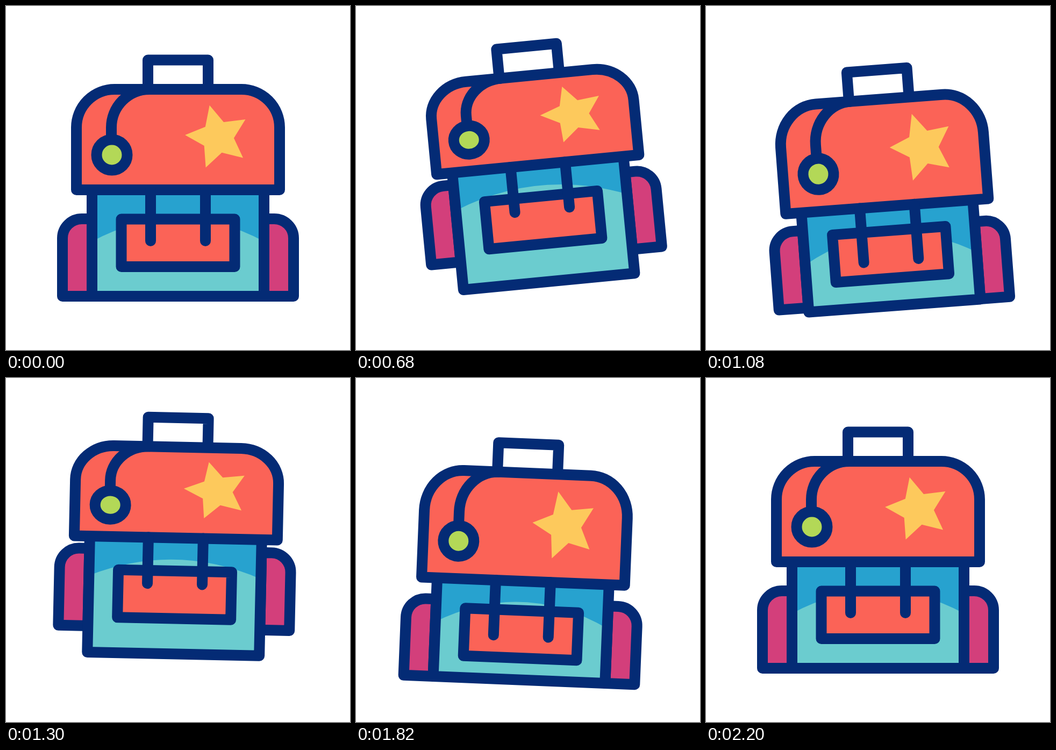
An HTML page with a canvas for the animation above (2400 ms loop, 640 px wide and 640 px high).

```html
<!DOCTYPE html>
<html lang="en">
<head>
<meta charset="utf-8">
<title>Jumping backpack</title>
<style>
  html, body { margin: 0; width: 100%; height: 100%; overflow: hidden; background: #fff; }
  canvas { display: block; width: 640px; height: 640px; }
</style>
</head>
<body>
<canvas id="stage" width="640" height="640"></canvas>
<script>
const ctx = document.getElementById('stage').getContext('2d');
const LOOP = 2400, STEP = 20, REST = 200, MOVE = 2000;
const BEATS = [490, 790, 1130, 1540]; // up, down, up, down
const PIVOT = 131, LID_TOP = 155;
const NAVY = '#042b75', CORAL = '#fb6357', YELLOW = '#fdc95c', LIME = '#b3d857',
      BLUE = '#27a2cf', TEAL = '#6bcccf', PINK = '#d33f7b';

// Starts and ends at 0, easing in and out of each peak
function swing(t, peaks, lag = 0, beats = BEATS) {
  let from = 0, start = 0;
  for (let i = 0; i <= peaks.length; i++) {
    const to = i < peaks.length ? peaks[i] : 0;
    const end = i < peaks.length ? beats[i] + lag : MOVE;
    if (t <= end) return from + (to - from) * (1 - Math.cos(Math.PI * (t - start) / (end - start))) / 2;
    from = to;
    start = end;
  }
  return 0;
}

// Stretches the outline from the lid's top edge, not the line weight
function shape(build, fill, outlined = true, stretch = 1) {
  ctx.save();
  ctx.translate(0, LID_TOP);
  ctx.scale(1, stretch);
  ctx.translate(0, -LID_TOP);
  ctx.beginPath();
  build();
  ctx.restore();
  if (fill) {
    ctx.fillStyle = fill;
    ctx.fill();
  }
  if (outlined) ctx.stroke();
}

function line(...points) {
  points.forEach(([x, y]) => ctx.lineTo(x, y));
}

function handle() {
  shape(() => line([264, LID_TOP], [264, 100.5], [376, 100.5], [376, LID_TOP]));
}

function pouch(side, dy) {
  const x = d => 320 + side * d, top = 396 + dy;
  shape(() => {
    ctx.moveTo(x(160), top);
    ctx.arcTo(x(215), top, x(215), top + 36, 36);
    line([x(215), top + 144], [x(160), top + 144]);
    ctx.closePath();
  }, PINK);
}

function body(wave) {
  const box = () => ctx.rect(160, 300, 320, 240);
  const bulge = 38 + wave / 4;
  const edge = 438 + wave, peak = 433 + wave - bulge;
  shape(box, BLUE, false);
  shape(() => {
    ctx.moveTo(160, edge);
    ctx.quadraticCurveTo(320, 2 * peak - edge, 480, edge);
    line([480, 540], [160, 540]);
  }, TEAL, false);
  shape(box);
}

function pocket(dy) {
  shape(() => ctx.rect(214.5, 396.5 + dy, 211, 88.5), CORAL);
}

function star() {
  for (let i = 0; i < 10; i++) {
    const r = i % 2 ? 30 : 61, a = (i * 36 - 104.5) * Math.PI / 180;
    ctx.lineTo(394 + r * Math.cos(a), 243.8 + r * Math.sin(a));
  }
}

function lid(stretch, ring) {
  shape(() => {
    ctx.moveTo(131, 342);
    ctx.arcTo(131, LID_TOP, 320, LID_TOP, 71);
    ctx.arcTo(509, LID_TOP, 509, 342, 71);
    ctx.lineTo(509, 342);
    ctx.closePath();
  }, CORAL, true, stretch);
  shape(() => {
    ctx.moveTo(267, LID_TOP);
    ctx.arcTo(196, LID_TOP, 196, 270, 71);
    ctx.lineTo(196, 270);
  }, null, true, stretch);
  const y = LID_TOP + 122 * stretch;
  shape(() => ctx.ellipse(197, y, 28.5, 28.5 * ring, 0, 0, Math.PI * 2), LIME);
  shape(star, YELLOW, false, stretch);
  for (const x of [269, 371]) {
    shape(() => line([x, 342], [x, 437]), null, true, stretch);
  }
}

function draw(t) {
  const rise = swing(t, [-25.5, 30, -27, 24], -10);
  const tilt = swing(t, [-6.25, -6.3, 4], 0, [620, 705, 1310]);
  const wave = swing(t, [-46, 25, -42, 0]);

  ctx.setTransform(1, 0, 0, 1, 0, 0);
  ctx.fillStyle = '#fff';
  ctx.fillRect(0, 0, 640, 640);
  ctx.translate(320, PIVOT + rise);
  ctx.rotate(tilt * Math.PI / 180);
  ctx.translate(-320, -PIVOT);
  ctx.strokeStyle = NAVY;
  ctx.lineWidth = 20;
  ctx.lineJoin = ctx.lineCap = 'round';

  handle();
  pouch(-1, swing(t, [-52, 0, -50, 0]));
  pouch(1, swing(t, [-47, 0, -60, 0], 70));
  body(wave);
  pocket(swing(t, [-21, 19, -12, 18], -80));
  lid(1 + swing(t, [-.11, .1, -.1, .083]), 1 + wave * .0016);
}

function tick() {
  const t = Math.floor(performance.now() % LOOP / STEP) * STEP;
  draw(Math.min(Math.max(t - REST, 0), MOVE));
  requestAnimationFrame(tick);
}
tick();
</script>
</body>
</html>
```
